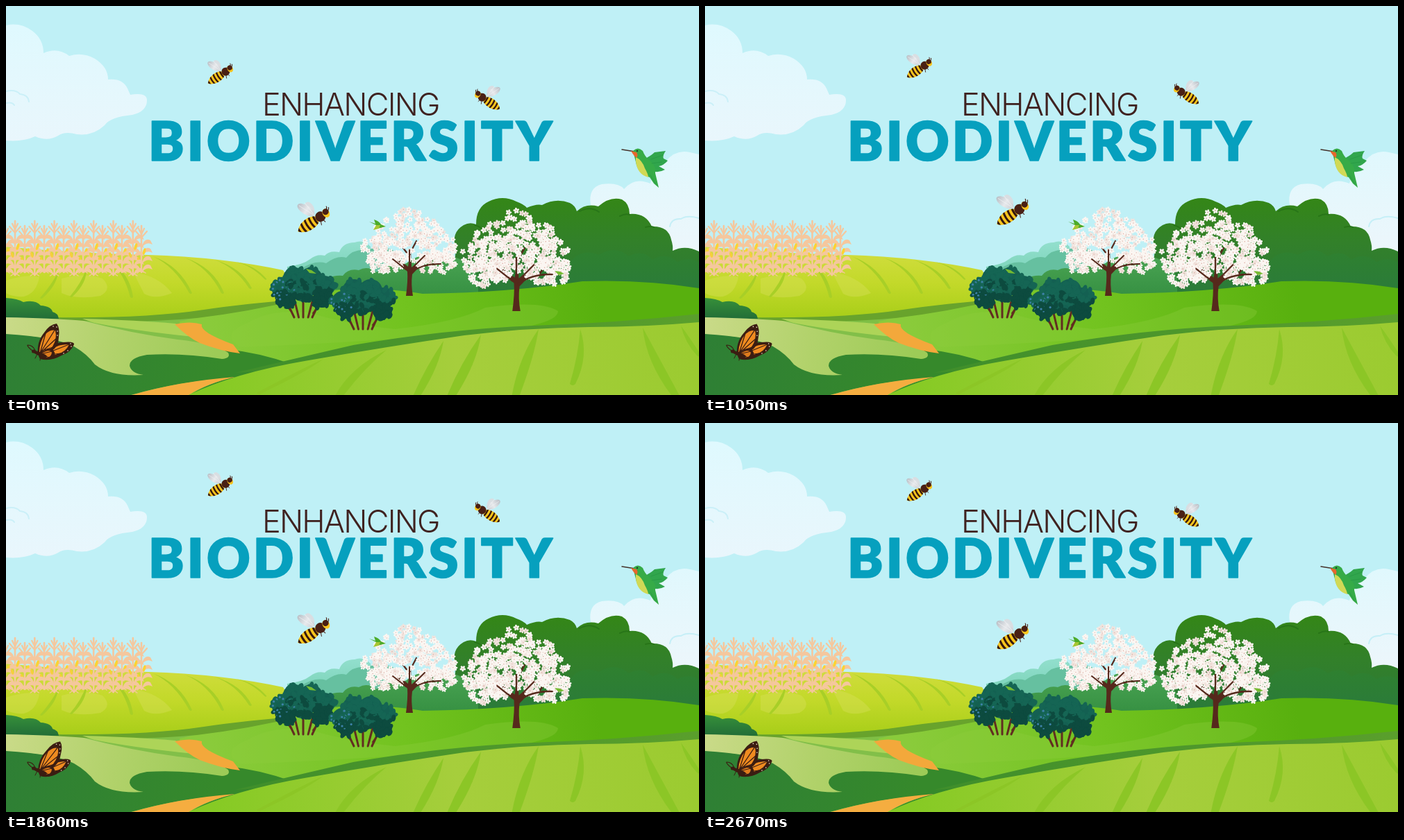
Write an HTML page with a canvas that moves like this. It is 998 px wide and 561 px high and loops after 2700 ms.

```html
<!DOCTYPE html>
<html lang="en">
<head>
<meta charset="utf-8">
<title>Enhancing Biodiversity</title>
<style>
  html, body { margin: 0; width: 100%; height: 100%; overflow: hidden; background: #bff0f6; }
  canvas { display: block; width: 998px; height: 561px; }
</style>
</head>
<body>
<canvas id="stage" width="998" height="561"></canvas>
<script>
const LOOP = 2700, FLAP = 180, TAU = Math.PI * 2;
const stage = document.getElementById('stage').getContext('2d');
const backdrop = document.createElement('canvas');
backdrop.width = 998;
backdrop.height = 561;
let ctx = backdrop.getContext('2d');

function seeded(seed) {
  return () => (seed = (seed * 16807) % 2147483647) / 2147483647;
}
function fill(path, color) {
  ctx.fillStyle = color;
  ctx.fill(new Path2D(path));
}
function line(path, color, width) {
  ctx.strokeStyle = color;
  ctx.lineWidth = width;
  ctx.stroke(new Path2D(path));
}
function oval(x, y, rx, ry, color, angle = 0) {
  ctx.fillStyle = color;
  ctx.beginPath();
  ctx.ellipse(x, y, rx, ry, angle, 0, TAU);
  ctx.fill();
}
function blend(x0, y0, x1, y1, ...colors) {
  const g = ctx.createLinearGradient(x0, y0, x1, y1);
  colors.forEach((c, i) => g.addColorStop(i / (colors.length - 1), c));
  return g;
}
function placed(x, y, sx, sy, draw) {
  ctx.save();
  ctx.translate(x, y);
  ctx.scale(sx, sy);
  draw();
  ctx.restore();
}
// A furrow swells from a point along a curve and ends rounded.
function furrow(x0, y0, cx, cy, x1, y1, w, color) {
  fill(`M${x0} ${y0}Q${cx - w} ${cy} ${x1 - w / 2} ${y1}Q${x1} ${y1 + w / 2} ${x1 + w / 2} ${y1}Q${cx + w} ${cy} ${x0} ${y0}Z`, color);
}

function sky() {
  ctx.fillStyle = '#bff0f6';
  ctx.fillRect(0, 0, 998, 561);
  fill('M0 28Q20 23 38 36Q54 48 54 68Q74 59 91 72Q110 66 128 76Q147 88 147 106Q168 104 175 119L179 128Q203 124 203 136Q203 152 182 157Q150 160 142 172Q125 188 102 185Q85 180 75 187Q60 196 42 188Q25 196 0 194Z',
    blend(0, 30, 0, 194, '#dff9fe', '#e9f6fc'));
  line('M0 123Q14 120 20 127Q32 128 33 138M0 140Q9 138 12 143', '#cbf0f8', 2);
  fill('M842 287Q838 262 858 257Q882 254 890 264Q905 246 928 256Q935 226 950 224Q965 206 985 211L998 214V360H842Z',
    blend(0, 210, 0, 350, '#e0f8fd', '#ecf6fb'));
  line('M956 318Q958 306 972 307Q981 301 998 306', '#c6eff7', 2);
}

function woods() {
  fill('M405 376Q428 373 438 365Q448 357 459 360Q466 352 480 355Q485 341 502 341Q514 336 525 347V400H405Z',
    blend(0, 340, 0, 390, '#92dfcd', '#7bd3b8'));
  fill('M425 379Q445 366 461 371Q477 359 490 363Q500 350 520 352Q550 340 575 365V410H425Z', '#66c0a0');
  fill('M640 425L648 351Q640 327 659 316Q668 311 677 315Q677 290 695 282Q715 272 735 282Q746 286 750 291Q764 285 772 287Q792 276 812 284Q820 288 822 296Q835 284 853 289Q870 274 887 279Q898 285 898 300Q921 298 930 318Q954 317 958 337Q961 346 960 353Q978 344 998 354V425Z',
    blend(0, 278, 0, 405, '#348617', '#32802a', '#2d7a35'));
  fill('M660 425Q655 388 674 388Q691 371 715 381Q739 364 760 377Q790 360 811 371Q828 348 854 359Q877 344 897 361Q917 350 931 366Q950 354 967 369Q984 361 998 370V425Z',
    blend(0, 350, 0, 410, '#2f812f', '#2b7b39'));
  fill('M455 405Q462 387 485 389Q493 378 508 381Q521 374 534 384Q552 366 575 372Q602 350 630 366Q646 356 664 372Q678 382 680 395V425H455Z',
    blend(0, 360, 0, 415, '#4aa453', '#379143'));
  line('M826 296Q841 288 854 297M884 303Q892 299 898 301M921 319Q928 317 933 319M675 316Q684 318 688 325', '#287518', 2);
}

function land() {
  fill('M0 449H440V561H0Z', '#7fbf45');
  fill('M250 455Q350 431 440 415Q510 400 600 415Q730 413 830 397Q920 394 998 407V561H250Z',
    blend(300, 500, 850, 400, '#8acb3b', '#72c31f', '#58b00e'));
  fill('M350 456Q380 437 435 442Q495 460 560 466Q650 456 690 435Q770 424 795 440Q795 464 650 474Q470 487 338 492Q305 474 350 456Z', '#8ccc3e55');

  fill('M0 347Q90 356 205 359Q310 362 399 381L424 423Q330 438 220 449Q120 455 65 449L0 425Z',
    blend(0, 348, 0, 450, '#d2dd40', '#c3d92a', '#a8ce19'));
  fill('M0 396Q30 386 48 391Q44 414 26 419Q10 420 0 414ZM80 393Q113 384 139 393Q154 408 136 418Q101 424 80 414ZM183 384Q220 389 239 414Q215 424 199 415Z', '#d8df5a66');
  const hill = '#a8cf27';
  furrow(211, 361, 246, 374, 266, 414, 4, hill);
  furrow(257, 363, 295, 376, 312, 414, 4, hill);
  furrow(300, 366, 335, 377, 352, 407, 4, hill);
  furrow(331, 369, 356, 374, 374, 394, 3, hill);
  furrow(151, 370, 174, 385, 181, 420, 4, hill);
  furrow(116, 378, 113, 399, 94, 419, 4, hill);
  furrow(75, 384, 69, 403, 51, 421, 4, hill);
  fill('M65 449Q200 451 285 438Q345 429 424 423Q350 441 275 450Q180 459 65 452Z', '#68a32c');
  fill('M0 421Q17 422 25 427Q42 423 50 432Q65 433 67 441Q75 443 76 451H0Z', blend(0, 420, 0, 450, '#37913a', '#236f37'));

  fill('M0 471L180 495H318Q365 500 410 516L330 536Q250 541 180 561H0Z',
    blend(0, 470, 300, 550, '#2e7f35', '#36892b'));
  fill('M265 561Q300 536 410 516Q470 505 520 500L480 561Z', '#378a2c');
  fill('M110 451Q190 453 244 458L275 478Q180 478 110 451Z', '#add458');
  fill('M112 454Q180 468 270 477L318 497Q210 492 112 454Z', '#82bf49');
  fill('M0 449Q65 450 112 454Q180 472 247 481Q302 487 320 500Q324 508 311 509Q255 500 203 503Q178 507 178 519Q181 530 198 532Q151 535 128 517Q117 502 98 491Q70 477 0 473Z',
    blend(0, 465, 300, 510, '#c9da88', '#b2d26b', '#9dcb57'));
  fill('M243 459Q265 454 282 459Q278 470 327 488L337 501Q310 498 279 486Q262 478 243 459Z', '#f3a83b');
  fill('M330 535Q250 541 181 561H263Q290 544 330 535Z', '#f5ad40');

  fill('M330 529Q405 511 500 489Q635 466 760 461Q880 457 998 444V462L480 518Z', blend(330, 0, 998, 0, '#3f8e2b', '#5a9f2c'));
  fill('M263 561Q330 529 430 512Q550 491 660 475Q750 464 840 463Q920 463 998 456V561Z',
    blend(300, 560, 998, 465, '#86ca24', '#a6ce3c', '#9bcb30'));
  const field = '#8cc626';
  furrow(457, 509, 426, 527, 365, 558, 8, field);
  furrow(548, 496, 505, 522, 478, 565, 11, field);
  furrow(630, 483, 614, 521, 590, 565, 10, field);
  furrow(684, 474, 666, 516, 640, 565, 12, field);
  furrow(767, 466, 750, 505, 734, 562, 11, field);
  furrow(827, 466, 832, 505, 816, 545, 8, field);
  furrow(917, 464, 933, 514, 965, 563, 11, field);
  furrow(972, 461, 984, 486, 998, 504, 6, field);
}

function corn() {
  const stalk = (x, top, base) => {
    const c = '#f5c79d';
    line(`M${x} ${top}V${base}`, c, 2.6);
    for (const side of [-1, 1]) {
      line(`M${x} ${top + 12}l${side * 4} -8M${x} ${top + 17}l${side * 8} -9`, c, 2.2);
      for (let y = top + 25; y < base; y += 12)
        fill(`M${x} ${y + 7}q${side * 4} -16 ${side * 13} -11l${side * 3} 6q${side * -9} -5 ${side * -16} 5Z`, c);
      line(`M${x} ${base - 3}l${side * 6} 4`, c, 1.5);
    }
    oval(x + 4, top + 37, 2, 5, '#fbd334', .3);
    oval(x - 4, top + 49, 1.8, 4, '#f7ce3c', -.3);
  };
  for (let i = 0; i < 8; i++) stalk(-1 + i * 28, 317, 384);
  for (let i = 0; i < 7; i++) stalk(13 + i * 28.3, 310, 388);
}

function bush(x, y, seed) {
  const rnd = seeded(seed), brown = '#612d20';
  for (const k of [-1, -.5, 0, .55, 1])
    line(`M${x + k * 27} ${y + 14}Q${x + k * 20} ${y + 28} ${x + k * 13} ${y + 43}`, brown, 3);
  line(`M${x - 18} ${y + 34}l-12 -17M${x + 14} ${y + 37}l13 -18`, brown, 2);
  const lobes = [[-29, 3, 17], [-13, -14, 17], [11, -13, 18], [30, -2, 17], [-1, 4, 18], [-24, 17, 13], [27, 17, 14]];
  for (const [lx, ly, r] of lobes) oval(x + lx, y + ly, r - 1, r - 2, ly > 10 ? '#0d4b3f' : '#146052');
  for (let i = 0; i < 220; i++) {
    const [lx, ly, r] = lobes[i % lobes.length];
    const a = rnd() * TAU, d = Math.sqrt(rnd()) * r;
    const px = x + lx + Math.cos(a) * d, py = y + ly + Math.sin(a) * d * .9;
    oval(px, py, 5, 3.2, py > y + ly + 4 || ly > 10 ? '#0d4b3f' : '#156554', rnd() * TAU);
    if (i % 7 === 0) oval(px, py, 1.6, 1.6, '#3f82aa');
  }
}

function blossomTree(x, base, scale, seed) {
  const rnd = seeded(seed), brown = '#56291c';
  const crown = [[-2, -104, 23], [-30, -91, 22], [28, -91, 22], [47, -70, 20], [-50, -67, 20],
    [-20, -69, 24], [16, -70, 24], [-42, -49, 18], [51, -49, 16], [28, -50, 17], [-20, -50, 14]];
  placed(x, base, scale, scale, () => {
    fill('M-5 0Q-2 -22 -3 -35L-19 -52L-17 -54L-2 -42Q0 -53 -1 -68H2L3 -41Q17 -51 22 -60L24 -58Q20 -47 4 -31Q2 -16 5 0Z', brown);
    const branches = 'M2 -34Q20 -47 45 -46M-5 -38Q-19 -51 -31 -53M0 -57L-12 -73M1 -62L10 -79M-16 -52L-19 -64M27 -44L35 -55';
    line(branches, brown, 2.2);
    for (let i = 0; i < 470; i++) {
      const [cx, cy, r] = crown[i % crown.length];
      const a = rnd() * TAU, d = r * Math.sqrt(rnd()), turn = rnd() * TAU;
      const px = cx + Math.cos(a) * d, py = cy + Math.sin(a) * d;
      for (let k = 0; k < 5; k++) {
        const t = turn + k * TAU / 5;
        oval(px + Math.cos(t) * 2.1, py + Math.sin(t) * 2.1, 1.8, 1.3, i % 4 ? '#fbf6f2' : '#f1e3dd', t);
      }
      oval(px, py, .7, .7, '#dba9a0');
    }
    line('M0 -35V-66M2 -34Q20 -47 45 -46M-5 -38L-24 -53M4 -40L22 -58', brown, 2);
  });
}

function tinyBirds() {
  fill('M523 311L532 314L530 308Q537 310 540 315L547 318L539 320L531 321L535 317Z', '#4cab29');
  fill('M533 316L539 316L537 321L529 323Z', '#a6c532');
  fill('M432 379l8 2 7 5-10 -1ZM790 382l8 1 6 3-8 2Z', '#75ba31');
}

function hummingbird() {
  line('M887 207L906 210', '#443129', 1.5);
  fill('M917 222Q929 216 934 211L950 209Q945 216 947 220L953 223Q947 230 940 231L949 236Q938 242 929 237Z', '#31a64d');
  fill('M903 209Q910 202 917 209Q920 217 926 222Q938 232 935 241L940 262L933 256L927 247Q910 242 907 225Z', '#36ab47');
  fill('M907 218Q916 222 920 234Q925 243 925 247Q909 243 907 224Z', '#d1d956');
  fill('M900 209L908 211Q911 215 908 219Q904 216 900 209Z', '#e7662d');
  oval(909, 209, 1.2, 1.2, '#253829');
  line('M929 221L946 215M930 227L944 225M928 244L936 257', '#289845', .8);
}

function title() {
  ctx.textBaseline = 'alphabetic';
  ctx.textAlign = 'left';
  ctx.font = '300 45px Inter, "Liberation Sans", sans-serif';
  ctx.letterSpacing = '-1.8px';
  ctx.fillStyle = '#3f2220';
  ctx.fillText('ENHANCING', 369, 158);
  ctx.font = '900 77px Lato, "Open Sans", sans-serif';
  ctx.letterSpacing = '4.2px';
  ctx.fillStyle = ctx.strokeStyle = '#06a0be';
  ctx.lineWidth = 1.6;
  ctx.fillText('BIODIVERSITY', 205, 223);
  ctx.strokeText('BIODIVERSITY', 205, 223);
}

function bee(x, y, sx, sy) {
  placed(x, y, sx, sy, () => {
    const brown = '#492015', yellow = '#f8c51d';
    oval(-9, -16, 6.5, 10, '#d9dee2', -.45);
    oval(-14, -14, 14, 6.5, blend(-26, -22, 0, -6, '#b7bdc4', '#e7e9ec', '#c6cbd1'), .55);
    line('M-2 -6L-24 -20M-3 -8L-16 -24', '#f4f5f6', .7);
    ctx.rotate(-.56);
    const abdomen = new Path2D('M-31 1Q-22 -9 -9 -8Q3 -7 4 0Q4 8 -9 9Q-23 10 -31 1Z');
    ctx.fillStyle = yellow;
    ctx.fill(abdomen);
    ctx.save();
    ctx.clip(abdomen);
    for (let k = 0; k < 5; k++) line(`M${-27 + k * 6.8} -10q-3 10 0 20`, '#35180f', 3);
    ctx.restore();
    line('M5 6l-2 5M9 6l1 4', brown, 1);
    oval(8, 0, 7.5, 7.5, brown);
    oval(17.5, 0, 5, 6.5, yellow);
    oval(18, -2, 4.5, 4.5, brown);
    line('M20 -4Q23 -5 23 -8M21 -1Q24 -2 25 -5', brown, 1.1);
  });
}

function butterfly(fold) {
  const dark = '#3b1d12', orange = '#ef8b20';
  line('M42 497Q39 489 31 489M41 499Q34 495 31 490', dark, 1.2);
  placed(49, 502, 1 - fold * .13, 1, () => {
    fill('M-2 3Q13 -16 32 -17Q50 -19 49 -14Q45 -3 31 2Q15 11 0 7Z', dark);
    fill('M4 1Q18 -14 42 -14Q37 -3 25 0Q12 5 4 1Z', orange);
    line('M4 1L42 -14M5 2L30 -1M13 -6L27 -13', dark, 1.2);
    for (const [x, y] of [[44, -15], [45, -11], [40, -5], [34, -1]]) oval(x, y, .8, .8, '#fff2dc');
  });
  ctx.save();
  ctx.translate(49, 502);
  ctx.transform(1, 0, -fold * .15, 1 - fold * .04, 0, 0);
  fill('M-3 1Q-5 -18 6 -31Q14 -43 24 -44Q29 -37 27 -25Q27 -11 17 -5Q8 5 -3 1Z', dark);
  fill('M-1 -2Q-1 -18 8 -29Q16 -36 22 -34Q25 -22 18 -11Q11 -2 1 -1Z', orange);
  line('M0 -1L22 -36M0 -1L24 -23M0 -1L8 -30M3 -5L19 -10', dark, 1.3);
  for (const [x, y] of [[19, -40], [24, -39], [25, -33], [25, -27]]) oval(x, y, .8, .8, '#fff2dc');
  ctx.restore();
  fill('M47 502Q65 489 69 498Q74 505 61 510Q51 509 45 502Z', dark);
  fill('M50 502Q63 493 66 500Q65 506 59 507Z', '#df7c1d');
  line('M50 502L66 498M50 502L62 507', dark, 1);
  oval(49, 502, 11, 2.7, dark, .38);
  oval(40, 498, 3, 2.6, dark);
  line('M45 502l-3 6M50 505l-1 6', dark, 1);
}

function paintBackdrop() {
  ctx.lineCap = ctx.lineJoin = 'round';
  sky();
  woods();
  land();
  corn();
  blossomTree(581, 418, 1, 71);
  blossomTree(735, 440, 1.15, 19);
  bush(428, 406, 37);
  bush(514, 423, 83);
  tinyBirds();
  hummingbird();
  title();
}

const wave = (t, period) => (1 - Math.cos(TAU * t / period)) / 2;

function frame() {
  const t = (performance.now() - start) % LOOP;
  const lift = wave(t, LOOP);
  ctx.drawImage(backdrop, 0, 0);
  bee(311, 98 - 10 * lift, .79, .79);
  bee(691, 135 - 9 * lift, -.79, .79);
  bee(446, 308 - 12 * lift, 1, 1);
  butterfly(wave(t, FLAP));
  requestAnimationFrame(frame);
}

paintBackdrop();
ctx = stage;
ctx.lineCap = ctx.lineJoin = 'round';
const start = performance.now();
frame();
</script>
</body>
</html>
```
